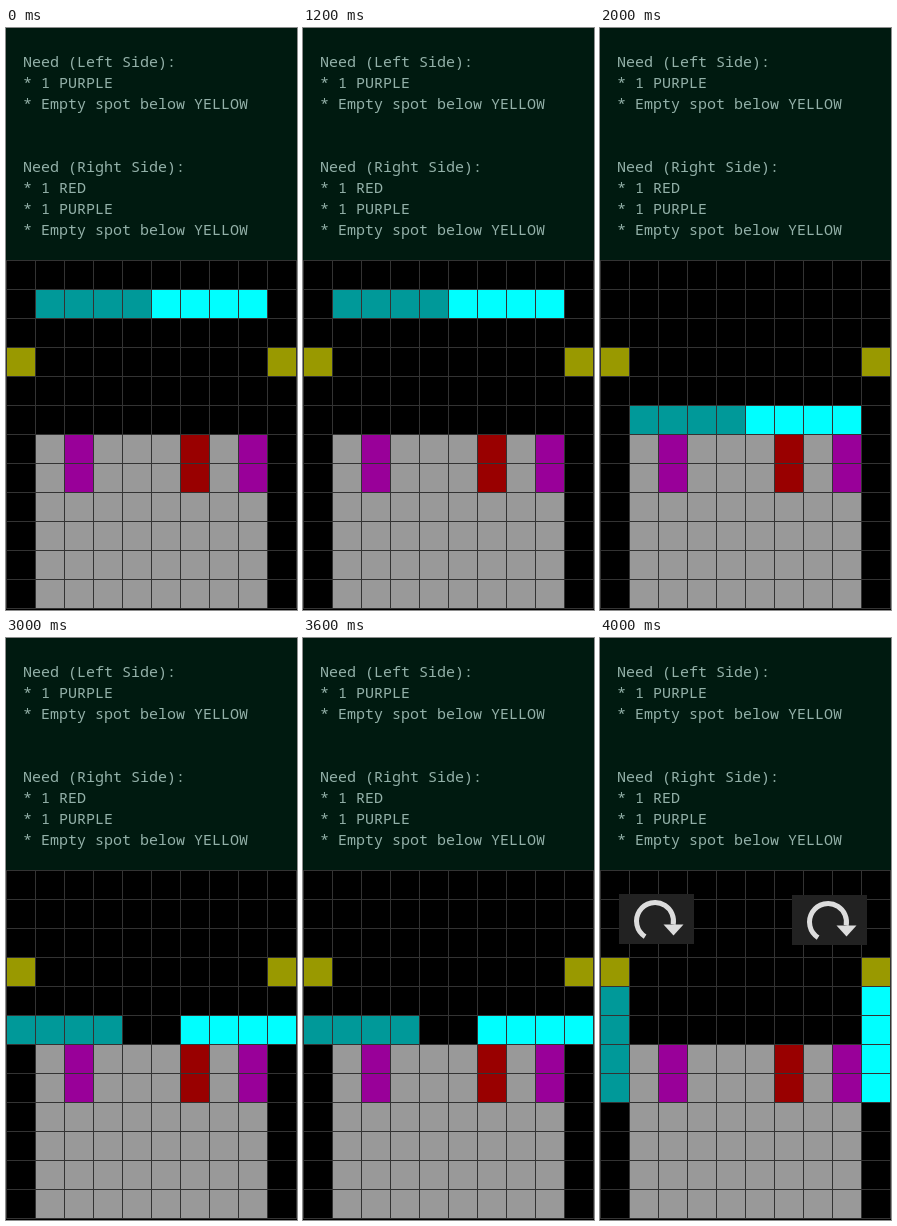
Write an HTML page with a canvas that moves like this. It is 291 by 582 pixels and loops after 5000 ms.

```html
<!DOCTYPE html>
<html lang="en">
<head>
<meta charset="utf-8">
<title>Block puzzle steps</title>
<style>
  html, body { margin: 0; width: 100%; height: 100%; overflow: hidden; background: #001a10; }
  canvas { position: absolute; left: 0; top: 0; }
  pre {
    position: absolute; left: 17px; top: 23px; margin: 0;
    font: 15px/21px "Noto Sans Mono", monospace; color: #93b1a9;
  }
</style>
</head>
<body>
<canvas id="stage" width="291" height="582"></canvas>
<pre>Need (Left Side):
* 1 PURPLE
* Empty spot below YELLOW


Need (Right Side):
* 1 RED
* 1 PURPLE
* Empty spot below YELLOW</pre>
<script>
const ctx = document.getElementById('stage').getContext('2d');
const CELL = 29, TOP = 232, COLS = 10, ROWS = 12, LOOP = 5000;
const TEAL = '#009999', CYAN = '#00ffff';

function cells(col, row, w, h, color) {
  ctx.fillStyle = color;
  ctx.fillRect(col * CELL, TOP + row * CELL, w * CELL, h * CELL);
}

function gridLines() {
  ctx.fillStyle = '#333333';
  for (let c = 0; c <= COLS; c++) ctx.fillRect(c * CELL, TOP, 1, ROWS * CELL + 1);
  for (let r = 0; r <= ROWS; r++) ctx.fillRect(0, TOP + r * CELL, 291, 1);
}

function turnArrow(x, y) {
  ctx.save();
  ctx.translate(x, y);
  ctx.fillStyle = '#222222';
  ctx.fillRect(0, 0, 75, 50);
  ctx.strokeStyle = ctx.fillStyle = '#dddddd';
  ctx.lineWidth = 5;
  ctx.beginPath();
  ctx.arc(36, 27, 18.5, Math.PI * 0.68, Math.PI * 2.06);
  ctx.stroke();
  ctx.beginPath();
  ctx.moveTo(44.5, 30.5);
  ctx.lineTo(64.5, 30.5);
  ctx.lineTo(54.5, 41.5);
  ctx.fill();
  ctx.restore();
}

function draw(t) {
  ctx.fillStyle = '#001a10';
  ctx.fillRect(0, 0, 291, TOP);
  ctx.fillStyle = '#000000';
  ctx.fillRect(0, TOP, 291, 350);

  cells(1, 6, 8, 6, '#999999');
  cells(2, 6, 1, 2, '#990099');
  cells(6, 6, 1, 2, '#990000');
  cells(8, 6, 1, 2, '#990099');
  cells(0, 3, 1, 1, '#999900');
  cells(9, 3, 1, 1, '#999900');

  // Bars start joined, drop, split apart, then swing upright.
  if (t < 4000) {
    const row = t < 2000 ? 1 : 5;
    const gap = t < 3000 ? 0 : 1;
    cells(1 - gap, row, 4, 1, TEAL);
    cells(5 + gap, row, 4, 1, CYAN);
  } else {
    cells(0, 4, 1, 4, TEAL);
    cells(9, 4, 1, 4, CYAN);
  }
  gridLines();

  if (t >= 4000) {
    turnArrow(19, 256);
    turnArrow(192, 257);
  }
}

const start = performance.now();
function tick() {
  draw((performance.now() - start) % LOOP);
  requestAnimationFrame(tick);
}
tick();
</script>
</body>
</html>
```
